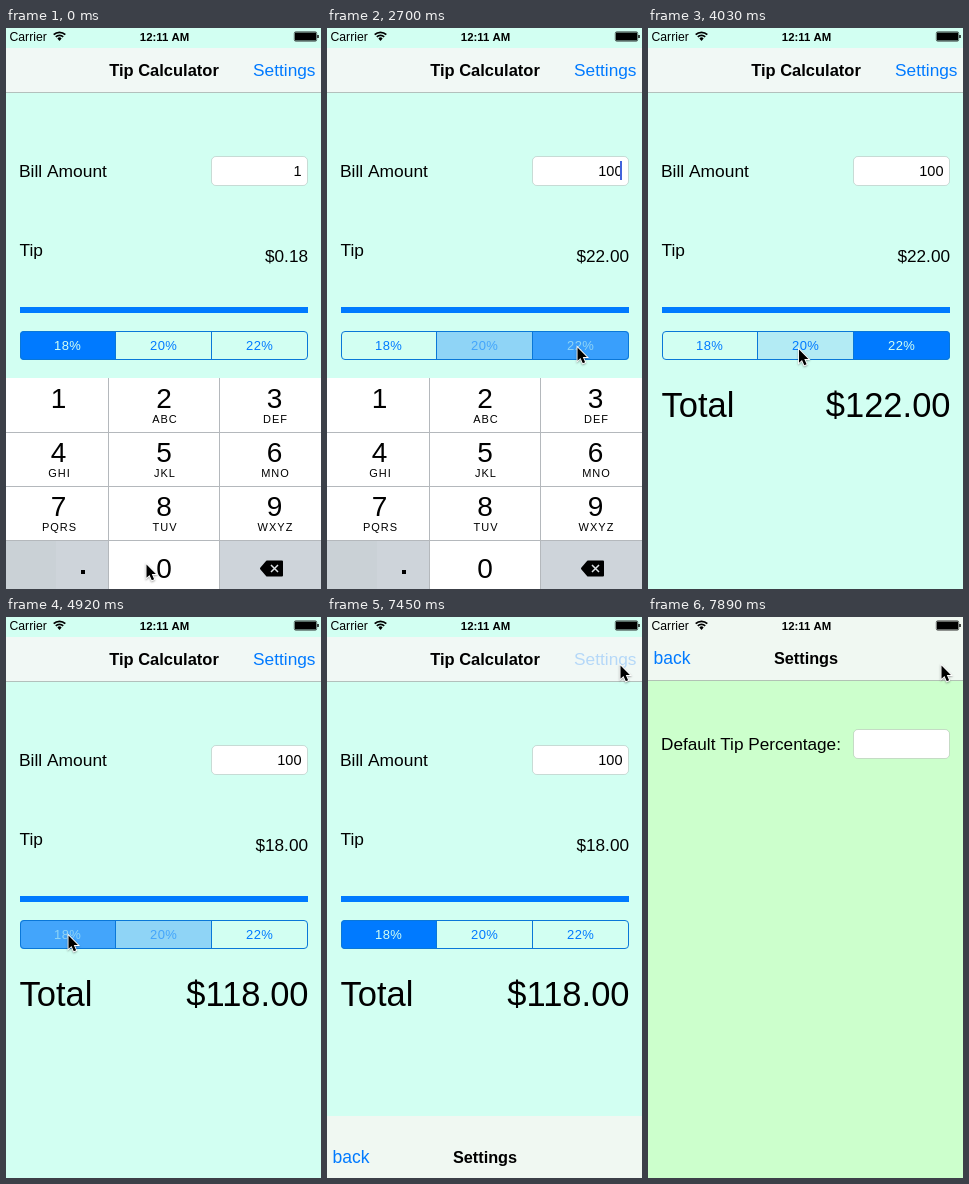
Animation of 315x561 px, one loop 8000 ms. Source, as an HTML page with a canvas:

```html
<!DOCTYPE html>
<html lang="en">
<head>
<meta charset="utf-8">
<title>Tip Calculator</title>
<style>
  html, body { margin: 0; width: 100%; height: 100%; overflow: hidden; background: #d2fff2; }
  canvas { display: block; }
</style>
</head>
<body>
<canvas id="stage" width="315" height="561"></canvas>
<script>
const ctx = document.getElementById('stage').getContext('2d');
const W = 315, H = 561, LOOP = 8000, TICK = 148.8; // the screen refreshes once per tick
const BLUE = [0, 122, 255], MINT = [210, 255, 242];

// Pointer tip: [tick, x, y]
const POINTER = [
  [0, 140, 536], [4, 140, 536], [5, 149, 490], [6, 171, 378], [7, 181, 298], [9, 157, 315],
  [11, 150, 319], [16, 150, 319], [17, 250, 319], [22, 250, 319], [24, 225, 270],
  [25, 220, 270], [27, 150.5, 321], [29, 150.5, 321], [30, 62, 318], [41, 62, 318],
  [42, 67, 311], [43, 100, 272], [45, 195, 150], [47, 285, 66], [48, 303, 48], [49, 293, 48]
];
// Percentage taps; held is true when the press shows before the selection changes
const TAPS = [
  { at: -9, seg: 0 }, { at: 12, seg: 1, held: true }, { at: 18, seg: 2, held: true },
  { at: 28, seg: 1, held: true }, { at: 33, seg: 0 }
];
const RATES = [18, 20, 22];
const LETTERS = ['', 'ABC', 'DEF', 'GHI', 'JKL', 'MNO', 'PQRS', 'TUV', 'WXYZ'];

const rgb = c => `rgb(${c.map(Math.round)})`;
const mix = (a, b, p) => rgb(a.map((v, i) => v + (b[i] - v) * p));
const mod = (a, n) => ((a % n) + n) % n;

function rect(x, y, w, h, color) {
  ctx.fillStyle = color;
  ctx.fillRect(x, y, w, h);
}

function text(str, x, y, size, { align = 'left', color = '#000', bold = false, spacing = 0 } = {}) {
  ctx.font = `${bold ? 'bold ' : ''}${size}px "Liberation Sans", Arial, sans-serif`;
  ctx.letterSpacing = spacing + 'px';
  ctx.textAlign = align;
  ctx.fillStyle = color;
  ctx.fillText(str, x, y);
}

function roundRect(x, y, w, h, r) {
  ctx.beginPath();
  ctx.roundRect(x, y, w, h, r);
}

function polygon(points) {
  ctx.beginPath();
  points.forEach(([x, y]) => ctx.lineTo(x, y));
  ctx.closePath();
}

function field(y) {
  roundRect(205.5, y + 0.5, 96, 29, 4.5);
  ctx.fillStyle = '#fff';
  ctx.fill();
  ctx.strokeStyle = 'rgba(0,0,0,.14)';
  ctx.lineWidth = 1;
  ctx.stroke();
}

function pointerAt(tick) {
  const i = POINTER.findIndex(p => p[0] > tick);
  if (i < 0) return POINTER.at(-1).slice(1);
  const [t0, x0, y0] = POINTER[i - 1], [t1, x1, y1] = POINTER[i];
  const p = (tick - t0) / (t1 - t0);
  return [x0 + (x1 - x0) * p, y0 + (y1 - y0) * p];
}

function drawSegments(tick, current) {
  const levels = [0, 0, 0], tap = TAPS[current], next = TAPS[current + 1];
  const fade = tick === tap.at ? 0.68 : 1;
  levels[tap.seg] = fade;
  if (current) levels[TAPS[current - 1].seg] = 1 - fade;
  const pressed = next?.held && tick === next.at - 1 ? next.seg
    : tap.held && tick === tap.at ? tap.seg : -1;

  ctx.save();
  roundRect(14, 303, 288, 29, 4);
  ctx.clip();
  levels.forEach((level, i) => {
    const x = 14 + i * 96;
    rect(x, 303, 96, 29, mix(MINT, BLUE, level));
    if (i === pressed) rect(x, 303, 96, 29, 'rgba(0,122,255,.15)');
    text(RATES[i] + '%', x + 47.7, 322, 13, { align: 'center', color: mix(BLUE, MINT, level), spacing: 0.4 });
  });
  ctx.restore();

  ctx.strokeStyle = '#0a77d8';
  ctx.lineWidth = 1;
  roundRect(14.5, 303.5, 287, 28, 3.5);
  ctx.stroke();
  rect(109, 303, 1, 29, '#0a77d8');
  rect(205, 303, 1, 29, '#0a77d8');
}

function drawKeyboard(offset, zeroDown) {
  const gray = '#ced4da', line = '#b4b8bc';
  ctx.save();
  ctx.translate(0, offset);
  rect(0, 350, W, 211, '#fff');
  rect(0, 512, 102, 49, gray);
  rect(0, 512, 50, 49, '#cad1d6');
  rect(214, 512, 101, 49, gray);
  if (zeroDown) rect(103, 513, 110, 48, gray);
  for (const y of [404, 458, 512]) rect(0, y, W, 1, line);
  for (const x of [102, 213]) rect(x, 350, 1, 211, line);

  const centers = [52.5, 158, 268.5];
  LETTERS.forEach((letters, i) => {
    const x = centers[i % 3], y = 380 + 54 * Math.floor(i / 3);
    text(String(i + 1), x, y, 28, { align: 'center' });
    text(letters, x + 1, y + 15, 11, { align: 'center', spacing: 1 });
  });
  text('0', 158, 550, 28, { align: 'center' });
  rect(75, 542, 4, 4, '#000');

  polygon([[255, 540.5], [261, 533.5], [276, 533.5], [276, 547.5], [261, 547.5]]);
  ctx.fillStyle = ctx.strokeStyle = '#000';
  ctx.lineJoin = 'round';
  ctx.lineWidth = 2;
  ctx.fill();
  ctx.stroke();
  ctx.strokeStyle = '#dfe3e6';
  ctx.lineWidth = 1.5;
  ctx.beginPath();
  ctx.moveTo(265, 537); ctx.lineTo(272, 544);
  ctx.moveTo(272, 537); ctx.lineTo(265, 544);
  ctx.stroke();
  ctx.restore();
}

function drawCalculator(tick) {
  const current = TAPS.findLastIndex(t => t.at <= tick);
  const bill = [1, 10, 100][Math.min(tick, 2)];
  const tip = bill * RATES[TAPS[current].seg] / 100;

  rect(0, 0, W, H, rgb(MINT));
  rect(0, 20, W, 44, '#f1f8f5');
  rect(0, 64, W, 1, '#b3c0bc');
  text('Tip Calculator', 158, 48, 16.5, { align: 'center', bold: true });
  text('Settings', 309.5, 48, 17.3, { align: 'right', color: tick >= 49 ? '#b5d8f8' : rgb(BLUE) });

  text('Bill Amount', 13, 149, 17.4);
  field(128);
  text(String(bill), 295.5, 148, 14.5, { align: 'right' });
  const caretOn = tick < 23 && mod(tick - 15, 6.7) < 3.6;
  if (caretOn) rect(293, 133, 2, 19, '#4263db');

  text('Tip', 13.5, 228, 17.3);
  text('$' + tip.toFixed(2), 302, 234, 17.2, { align: 'right' });
  rect(14, 279, 288, 6, rgb(BLUE));
  drawSegments(tick, current);
  text('Total', 13.5, 389, 34.5);
  text('$' + (bill + tip).toFixed(2), 302.5, 389, 34.5, { align: 'right' });

  if (tick < 26) drawKeyboard(tick < 24 ? 0 : tick < 25 ? 70 : 185, tick === 1 || tick === 2);
}

function drawSettings(tick) {
  const phase = 0.56 + 2.8 * (tick - 50); // critically damped slide
  ctx.save();
  ctx.translate(0, Math.floor(H * (1 + phase) * Math.exp(-phase)));
  rect(0, 0, W, H, '#ccffcc');
  rect(0, 0, W, 63, '#f0f8f2');
  rect(0, 63, W, 1, '#b2c2b5');
  text('back', 5.5, 47, 17.5, { color: rgb(BLUE) });
  text('Settings', 158, 47, 16.3, { align: 'center', bold: true });
  text('Default Tip Percentage:', 13, 133, 17.2);
  field(112);
  ctx.restore();
}

function drawStatusBar() {
  text('Carrier', 3.5, 13, 12.2);
  text('12:11 AM', 158.5, 12.5, 11.4, { align: 'center', bold: true });
  ctx.strokeStyle = '#000';
  ctx.lineWidth = 1.8;
  for (const r of [8.2, 5.2]) {
    ctx.beginPath();
    ctx.arc(53.5, 12.5, r, -Math.PI * 0.75, -Math.PI * 0.25);
    ctx.stroke();
  }
  ctx.fillStyle = '#000';
  ctx.beginPath();
  ctx.moveTo(53.5, 13);
  ctx.arc(53.5, 12.5, 3, -Math.PI * 0.75, -Math.PI * 0.25);
  ctx.fill();
  ctx.lineWidth = 0.6;
  roundRect(288.3, 3.8, 22.4, 9.4, 1.5);
  ctx.stroke();
  rect(289, 4.5, 21, 8, '#000');
  rect(311.3, 7, 1.4, 3, '#000');
}

function drawPointer(tick) {
  const [x, y] = pointerAt(tick);
  ctx.save();
  ctx.translate(x + 0.5, y + 0.5);
  polygon([[0, 0], [0, 13.2], [3, 10.4], [5.3, 15.8], [7.6, 14.8], [5.3, 9.6], [9.4, 9.6]]);
  ctx.shadowColor = 'rgba(0,0,0,.35)';
  ctx.shadowBlur = 2;
  ctx.shadowOffsetY = 1;
  ctx.lineJoin = 'miter';
  ctx.strokeStyle = '#fff';
  ctx.lineWidth = 1.8;
  ctx.stroke();
  ctx.shadowColor = 'transparent';
  ctx.fillStyle = '#000';
  ctx.fill();
  ctx.restore();
}

function render(now) {
  const tick = Math.floor((now % LOOP) / TICK);
  drawCalculator(tick);
  if (tick >= 50) drawSettings(tick);
  drawStatusBar();
  drawPointer(tick);
  requestAnimationFrame(loop);
}

const start = performance.now();
function loop() {
  render(performance.now() - start);
}
loop();
</script>
</body>
</html>
```
